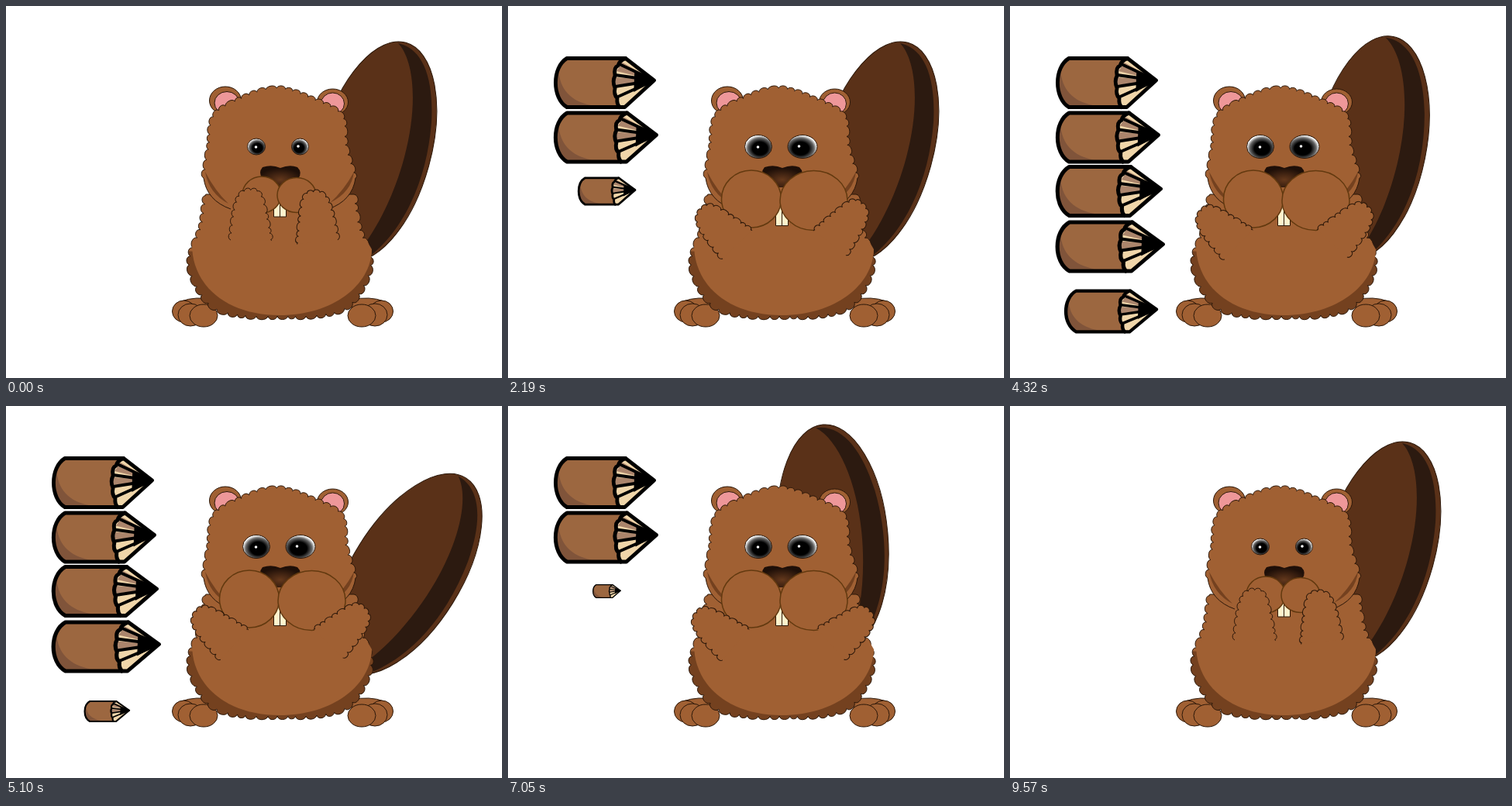
An HTML page that plays this animation: 640x480 px, repeating every 9.6 s.

```html
<!DOCTYPE html>
<html lang="en">
<head>
<meta charset="utf-8">
<title>Beaver and logs</title>
<style>
  html, body { margin: 0; width: 100%; height: 100%; overflow: hidden; background: #fff; }
  svg { display: block; width: 100vw; height: 100vh; }
  .fur { fill: #a06033; }
  .line { stroke: #2b1709; stroke-width: 1; stroke-linejoin: round; }
  .cheek { fill: #a06033; stroke: #62390f; stroke-width: 1.5; }
  .ink { fill: none; stroke: #000; stroke-width: 5; stroke-linejoin: round; stroke-linecap: round; }
  .shade { fill: #74411f; }
</style>
</head>
<body>
<svg viewBox="0 0 640 480">
  <defs>
    <radialGradient id="eyeFill" cx=".56" cy=".58" r=".56">
      <stop offset=".5" stop-color="#000"/>
      <stop offset=".8" stop-color="#666"/>
      <stop offset="1" stop-color="#fff"/>
    </radialGradient>
    <radialGradient id="eyeFillR" href="#eyeFill" cx=".44"/>
    <radialGradient id="noseFill" cy=".65" r=".55">
      <stop offset="0" stop-color="#64381c"/>
      <stop offset="1" stop-color="#1e0f08"/>
    </radialGradient>
    <linearGradient id="bodyFill" gradientUnits="userSpaceOnUse" x1="0" y1="316" x2="0" y2="317">
      <stop offset="0" stop-color="#a06033"/>
      <stop offset="1" stop-color="#74411f"/>
    </linearGradient>
    <g id="log">
      <path d="M-50-31.500H28L14-14 13 4 20 31.500H-50C-70 20-70-20-50-31.500Z" fill="#9c6740"/>
      <path d="M-61-17C-60 8-45 24-18 29H-50C-62 22-65 2-61-17Z" fill="#80543a"/>
      <path d="M28-31.500L14-14 13 4 20 31.500H27L66-3Z" fill="#f0d6aa"/>
      <path d="M24-26L66-3 16-15ZM14-7L66-3 13 3Z" fill="#ab856c"/>
      <path class="ink" d="M28-31.500H-50C-70-20-70 20-50 31.500H27L66-3Z"/>
      <path class="ink" d="M28-31.500Q20-29 18-22 12-20 14-9 10-2 14 7 12 15 17 20 16 27 20 31.500"/>
      <path class="ink" style="stroke-width:4" d="M22-23L66-3M14-10L66-3M14 5L66-3M18 18L66-3"/>
      <path d="M40-15L66-3 39 12Z"/>
    </g>
    <g id="foot" class="fur line">
      <path d="M226 381Q245 374 268 379V405H230Z"/>
      <ellipse cx="229.500" cy="394" rx="15" ry="14"/>
      <ellipse cx="238" cy="398.500" rx="16" ry="14.500"/>
      <ellipse cx="255" cy="399.500" rx="18" ry="14.500"/>
    </g>
    <g id="arm">
      <path id="armFill" class="fur"/>
      <path id="armLine" class="line" fill="none"/>
    </g>
  </defs>

  <g id="logs"></g>

  <g id="tail">
    <ellipse class="line" cx="477" cy="188" rx="71" ry="146" fill="#5a3118" transform="rotate(15.5 477 188)"/>
    <path d="M506 48C528 72 531 132 514 195 502 240 482 282 459 312L473 320C520 280 544 215 549 150 552 95 539 55 506 48Z" fill="#2c1a10"/>
  </g>

  <use href="#foot"/>
  <use href="#foot" transform="matrix(-1 0 0 1 714 0)"/>
  <path id="body" class="line" fill="url(#bodyFill)"/>
  <path class="fur" d="M240 308C240 360 284 399 353 399S471 360 472 314L464 300H250Z"/>

  <g class="line">
    <ellipse class="fur" cx="283" cy="122" rx="20.500" ry="18"/>
    <ellipse cx="285" cy="125" rx="16" ry="14.500" fill="#ee9799"/>
    <ellipse class="fur" cx="421.500" cy="124" rx="20" ry="17"/>
    <ellipse cx="421.500" cy="126" rx="15" ry="14" fill="#ee9799"/>
  </g>

  <path id="headFill" class="fur"/>
  <path id="headLine" class="line" fill="none"/>
  <path class="shade" d="M257 214Q262 242 287 255 270 239 257 214ZM449 214Q446 240 418 254 436 238 449 214Z"/>
  <path d="M354 209Q366 204 376 208 383 215 377 223L362 234H346L331 223Q325 215 331 208 343 204 354 209Z" fill="url(#noseFill)"/>
  <path id="teeth" class="line" fill="#fff3cc"/>
  <ellipse id="cheekL" class="cheek"/>
  <ellipse id="cheekR" class="cheek"/>
  <g class="line">
    <ellipse id="eyeL" fill="url(#eyeFill)"/>
    <ellipse id="eyeR" fill="url(#eyeFillR)"/>
  </g>
  <g fill="#fff">
    <circle cx="322.500" cy="182" r="1.800"/>
    <circle id="glintR" cy="181" r="1.800"/>
  </g>
  <use id="armL" href="#arm"/>
  <use id="armR" href="#arm"/>
</svg>

<script>
const LOOP = 9600, FRAME = 30, STEP = 900;
const $ = id => document.getElementById(id);
const set = (el, attrs) => { for (const key in attrs) el.setAttribute(key, attrs[key]); };
const mix = (a, b, u) => a + (b - a) * u;
const clamp = u => Math.min(1, Math.max(0, u));

let seed = 7;
const random = () => (seed = seed * 16807 % 2147483647) / 2147483647;

// Catmull-Rom curve through a few key points, finely sampled.
function curve(keys, steps = 60) {
  const at = i => keys[Math.min(keys.length - 1, Math.max(0, i))];
  const points = [keys[0]];
  for (let i = 0; i < keys.length - 1; i++) {
    const [a, b, c, d] = [at(i - 1), at(i), at(i + 1), at(i + 2)];
    for (let k = 1; k <= steps; k++) {
      const u = k / steps;
      points.push([0, 1].map(n => b[n] + u / 2 * (c[n] - a[n]
        + u * (2 * a[n] - 5 * b[n] + 4 * c[n] - d[n] + u * (3 * (b[n] - c[n]) + d[n] - a[n])))));
    }
  }
  return points;
}

// Uneven tufts along a clockwise curve, facing outward.
function fur(keys, size, depth) {
  const points = curve(keys), end = points[points.length - 1];
  let last = points[0], reach = size, d = '';
  for (const p of points) {
    const dx = p[0] - last[0], dy = p[1] - last[1];
    const length = Math.hypot(dx, dy);
    if (length < reach && p !== end || !length) continue;
    const out = depth * Math.min(1, length / size) / length;
    const control = u => `${last[0] + dx * u + dy * out} ${last[1] + dy * u - dx * out}`;
    d += `C${control(.15)} ${control(.95)} ${p}`;
    last = p;
    reach = size * (.75 + random() * .5);
  }
  return d;
}

const mirror = ([x, y]) => [707 - x, y];
const side = [[258, 243], [252, 285], [239, 318], [239, 346], [265, 387], [306, 399]];
const bodyKeys = [...side.map(mirror), [353.5, 400], ...side.reverse()];
set($('body'), { d: `M${bodyKeys[0]}${fur(bodyKeys, 12, 6)}Z` });

const headKeys = [
  [255, 222], [262, 180], [268, 142], [300, 121], [350, 106], [402, 123], [434, 142], [438, 180], [451, 222]
];
const headLine = `M290 262Q259 251 ${headKeys[0]}${fur(headKeys, 11, 5)}Q447 251 416 262`;
set($('headLine'), { d: headLine });
set($('headFill'), { d: headLine + 'Z' });

const armKeys = [[-26, 0], [-21, -38], [-13, -60], [3, -64], [14, -54], [26, 1]];
const armLine = `M${armKeys[0]}${fur(armKeys, 9, 4.5)}`;
set($('armLine'), { d: armLine });
set($('armFill'), { d: armLine + 'Z' });

// Five logs in a column, each growing in turn and leaving in reverse.
const logs = [99, 169.5, 239, 310.5, 394].map((y, i) => {
  const el = document.createElementNS('http://www.w3.org/2000/svg', 'use');
  el.setAttribute('href', '#log');
  $('logs').append(el);
  return { el, x: 124.5 + 1.4 * i, y, wide: .97 + .023 * i, grow: i * STEP, shrink: (9 - i) * STEP };
});

// Linear keyframes: each entry is a time followed by its value.
function track(keys, t) {
  let i = 1;
  while (i < keys.length - 1 && t > keys[i][0]) i++;
  const [t0, a] = keys[i - 1], [t1, b] = keys[i];
  return mix(a, b, clamp((t - t0) / (t1 - t0)));
}

const PUFF = [[0, 0], [900, 1], [9000, 1], [9570, 0]];
const TAIL = [[2190, 0], [3690, -26.3], [4980, 19], [6900, -21.8], [9570, 0]];

function ellipse(id, from, to, u) {
  const [cx, cy, rx, ry] = from.map((v, i) => mix(v, to[i], u));
  set($(id), { cx, cy, rx, ry });
}

// Arm pose (x, y, angle): mouth to spread by puff, spread itself drifting over time.
function placeArm(id, mouth, early, late, drift, puff, flip) {
  const [x, y, angle] = mouth.map((v, i) => mix(v, mix(early[i], late[i], drift), puff));
  set($(id), { transform: `translate(${x} ${y}) rotate(${angle}) scale(${flip} 1)` });
}

function draw(t) {
  for (const { el, x, y, wide, grow, shrink } of logs) {
    const s = t < shrink
      ? mix(.2, 1, clamp((t - grow) / STEP))
      : mix(1, .12, clamp((t - shrink) / STEP));
    set(el, {
      visibility: t > grow && t < shrink + STEP ? 'visible' : 'hidden',
      transform: `translate(${x} ${y}) scale(${s * wide} ${s})`
    });
  }

  set($('tail'), { transform: `rotate(${track(TAIL, t)} 397 338)` });

  const puff = track(PUFF, t);
  ellipse('cheekL', [330, 243.5, 25, 23.5], [314, 249, 38.5, 37], puff);
  ellipse('cheekR', [375, 244, 25, 22.5], [394.5, 251, 43.5, 38.5], puff);
  ellipse('eyeL', [323, 181.5, 11.5, 10.5], [323, 181.5, 17.5, 15], puff);
  ellipse('eyeR', [379.5, 181.5, 11, 10.5], [380, 181.5, 19, 15], puff);
  set($('glintR'), { cx: mix(377, 375.5, puff) });
  set($('teeth'), { d: `M345.500 250V${mix(272, 283.5, puff)}H361.500V250ZM353.500 250v${mix(22, 33.5, puff)}` });

  const drift = clamp((t - 900) / 8100);
  placeArm('armL', [316, 302, 0], [296, 307.5, -43.6], [292.7, 308, -52.6], drift, puff, 1);
  placeArm('armR', [402, 304, -5], [415.2, 305, 35.5], [417.2, 307.8, 54.2], drift, puff, -1);
}

const start = performance.now();
function tick() {
  const t = (performance.now() - start) % LOOP;
  draw(Math.floor(t / FRAME) * FRAME);
  requestAnimationFrame(tick);
}
tick();
</script>
</body>
</html>
```
